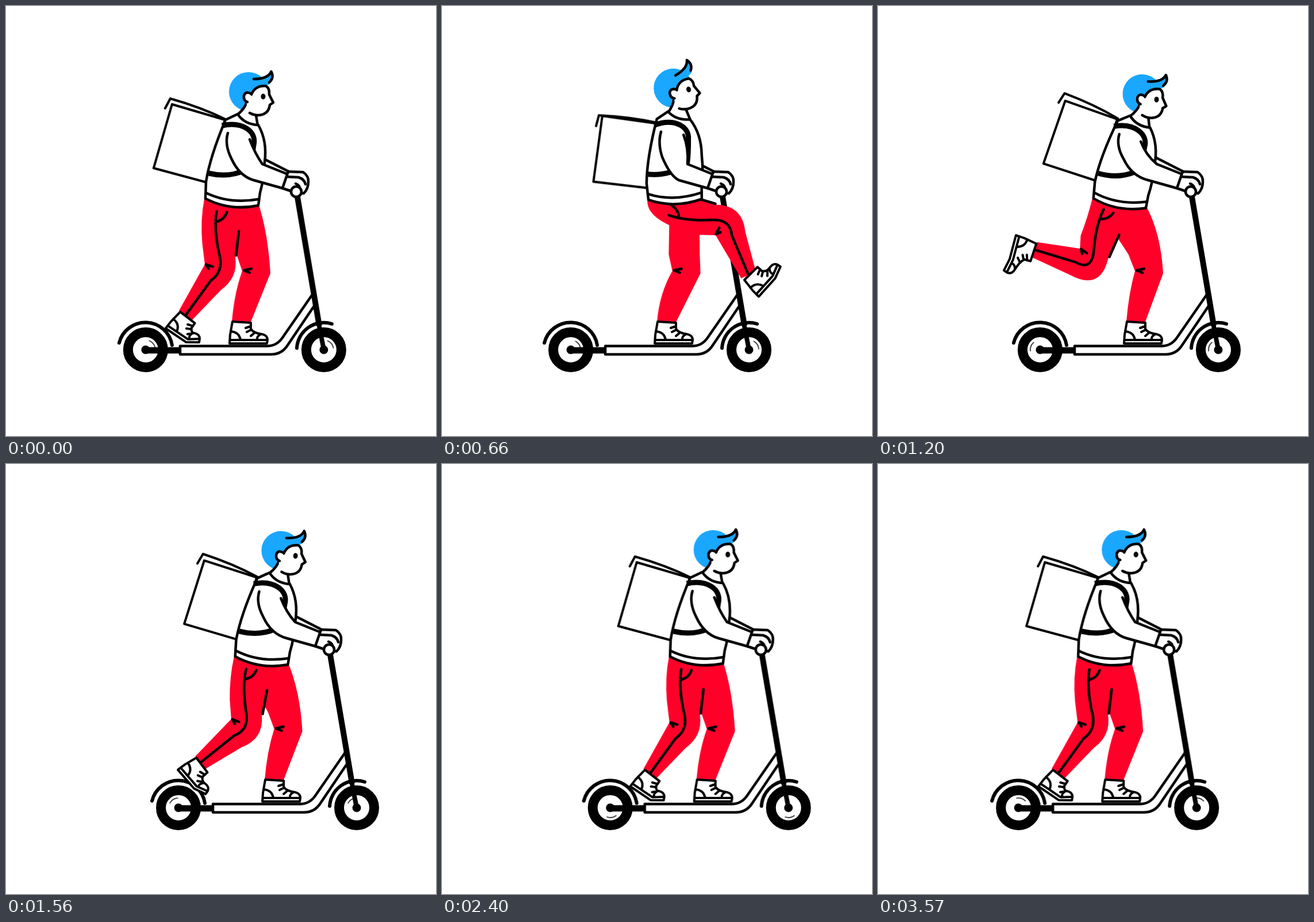
An HTML page for the animation above (3.6 s loop, 748x748 px).

```html
<!DOCTYPE html>
<html lang="en">
<head>
<meta charset="utf-8">
<title>Scooter courier</title>
<style>
  html, body { margin: 0; width: 100%; height: 100%; overflow: hidden; background: #fff; }
  svg { display: block; width: 100vw; height: 100vh; }
  .line { fill: none; stroke: #000; stroke-width: 4.5; stroke-linecap: round; stroke-linejoin: round; }
  .paper { fill: #fff; }
  .red { fill: #ff0029; }
  .blue { fill: #1aa7ff; }
  .thin { stroke-width: 4; }
  .strap { stroke-width: 9; stroke-linecap: butt; }
  .glint { stroke-width: 1.5; animation: spin 3600ms linear infinite; }
  @keyframes spin { from { transform: rotate(-40deg); } to { transform: rotate(3920deg); } }
</style>
</head>
<body>
<svg viewBox="0 0 748 748">
  <defs>
    <g id="wheel">
      <circle r="30.5" fill="#fff" stroke="#000" stroke-width="17"/>
      <circle r="7.5"/>
    </g>
  </defs>
  <g id="all">
    <g id="scooter">
      <use href="#wheel" x="244" y="598"/>
      <use href="#wheel" x="554" y="598"/>
      <g transform="translate(244 598)"><path class="line glint" d="M15 -8A17 17 0 0 1 15 8"/></g>
      <g transform="translate(554 598)"><path class="line glint" d="M15 -8A17 17 0 0 1 15 8"/></g>
      <path class="line" style="stroke-width:6" d="M198 586A47 47 0 0 1 290 590"/>
      <path class="line" style="stroke-width:6" d="M507 595A47 47 0 0 1 568 553"/>
      <path class="line" style="stroke-width:11;stroke-linecap:butt" d="M244 599H304"/>
      <path class="line paper" d="M304 591.500H455Q472 591.500 482 577L536 499L541 516L491 590Q481 606 462 606H304Z"/>
      <path class="line" style="stroke-width:10;stroke-linecap:butt" d="M507 326L546 556"/>
      <path class="line" style="stroke-width:8" d="M545 552L554 598"/>
    </g>
    <path class="line paper" d="M446 264L493 288L490 294L446 276"/>
    <path id="farLeg" class="red"/>
    <path id="farMark" class="line"/>
    <path id="farShoe" class="line paper thin"/>
    <path id="farLace" class="line thin"/>
    <path id="leg" class="red"/>
    <path id="seams" class="line"/>
    <path id="shoe" class="line paper thin"/>
    <path id="lace" class="line thin"/>
    <g id="torso">
      <g id="box">
        <path class="line paper thin" d="M290 172L382 199L351 308L258 283Z"/>
        <path id="lid" class="line thin" d="M278 179L287 162Q340 177 383 198"/>
      </g>
      <g id="head">
        <circle class="blue" cx="423" cy="149" r="34"/>
        <g id="tuft">
          <path class="blue" d="M425 125Q457 126 463 114Q468 126 458 137L430 145Z"/>
          <path class="line" d="M432 127Q457 127 462.500 114Q468 125 459 133"/>
        </g>
        <path class="paper" d="M419 160L415 178L398 200L420 215L442 212L436 186Z"/>
        <path class="line" d="M420 166Q418 177 403 190M436 190L439 208"/>
        <path class="paper" d="M428 153Q434 138 453 139Q460 143 459 154L466 168L460 172Q458 189 440 190Q430 190 420 182V158Z"/>
        <path class="line" d="M428 154Q434 138 453 139Q460 143 459 154L466 168L460 172Q458 189 440 190Q432 190 425 186"/>
        <path class="line paper" d="M428 153Q418 147 415 156Q414 165 421 167"/>
        <ellipse cx="448.500" cy="157.500" rx="4" ry="5"/>
      </g>
      <path class="line paper" d="M383 198L404 188Q416 206 440 207Q456 235 451 272Q450 300 443 325L440 347Q390 357 348 335L349 306Q356 262 383 198Z"/>
      <path class="line" d="M349 325Q390 345 441 336"/>
      <path class="line strap" d="M377 208C412 200 438 218 432 242Q429 264 424 282M354 291Q388 299 416 286"/>
    </g>
    <path id="armFill" class="paper"/>
    <path id="arm" class="line"/>
    <path class="line paper" d="M492 288L518 289Q528 296 527 306Q527 318 519 326L500 323L482 317Z"/>
    <path class="line" d="M490 297L510 298Q520 301 522 310M505 309Q513 312 512 319"/>
    <circle class="line paper" cx="506" cy="323" r="9"/>
  </g>
</svg>
<script>
const LOOP = 3600, RAD = Math.PI / 180;
const $ = id => document.getElementById(id);

// Kicking leg: angles of thigh and shin from straight down, of the foot, and of the bent toe
const rest = { thigh: -4, shin: -36, foot: 34, bend: 34 };
const poses = [
  { at: 0, ...rest },
  { at: 460, thigh: 80, shin: 54, foot: -50, bend: 15 },
  { at: 660, thigh: 76, shin: 23, foot: -48, bend: 18 },
  { at: 930, thigh: 6, shin: -14, foot: 35, bend: 5 },
  { at: 1190, thigh: -21, shin: -107, foot: 105, bend: -12 },
  { at: 1720, ...rest },
  { at: LOOP, ...rest }
];

// Monotone cubic through one joint of the poses
function joint(name, t) {
  const secant = i => poses[i + 1] && poses[i]
    ? (poses[i + 1][name] - poses[i][name]) / (poses[i + 1].at - poses[i].at) : 0;
  const slope = i => {
    const a = secant(i - 1), b = secant(i);
    return a * b <= 0 ? 0 : 2 * a * b / (a + b);
  };
  const i = poses.findIndex(p => p.at > t) - 1;
  const h = poses[i + 1].at - poses[i].at, u = (t - poses[i].at) / h, v = 1 - u;
  return v * v * (1 + 2 * u) * poses[i][name] + u * u * (3 - 2 * u) * poses[i + 1][name]
    + h * u * v * (v * slope(i) - u * slope(i + 1));
}

// Cosine ease from 0 to 1 between two times, skewed by a power
const ease = (t, from, to, power = 1) => {
  const u = Math.min(1, Math.max(0, (t - from) / (to - from)));
  return (1 - Math.cos(Math.PI * u ** power)) / 2;
};

// The push drives the scooter forward, then it drifts back into the next loop
function ride(t) {
  const u = t < 690 ? t + LOOP : t;
  return -20 + 76 * (ease(u, 690, 1500, 0.85) - ease(u, 1500, 690 + LOOP, 1.42));
}

// Upright for the kick, leaning forward for the push
const swayAt = t => 1.05 * ease(t, 0, 560) - 1.4 * ease(t, 560, 1200) + 0.35 * ease(t, 1200, 1900);
const dipAt = t => 12 * Math.exp(-(((t - 930) / 140) ** 2));

// A frame at (ox, oy) turned by deg: maps local x, y to stage coordinates
const frame = (ox, oy, deg) => {
  const c = Math.cos(deg * RAD), s = Math.sin(deg * RAD);
  return (x, y) => [ox + x * c - y * s, oy + x * s + y * c];
};

// Joins command letters and points into path data
const path = parts => parts.map(p => typeof p === 'string' ? p : p.map(v => v.toFixed(2)).join(' ')).join(' ');
const set = (id, ...parts) => $(id).setAttribute('d', path(parts));
const place = (id, transform) => $(id).setAttribute('transform', transform);

function drawShoe(id, laceId, f, bend) {
  const ball = frame(22, 36, -bend);
  const toe = (x, y) => f(...ball(x - 22, y - 36));
  set(id, 'M', f(-16, -1), 'L', f(16, 1), 'L', f(16, 12), 'Q', f(21, 19), toe(36, 21),
    'Q', toe(45, 23), toe(45, 31), 'L', toe(44, 37), 'L', f(22, 37), 'L', f(-21, 37), 'L', f(-20, 22), 'Z');
  set(laceId, 'M', f(-20, 31), 'L', f(22, 31), 'L', toe(44, 31),
    'M', f(-19, 16), 'Q', f(-5, 17), f(-2, 30), 'M', toe(33, 21), 'Q', toe(26, 25), toe(27, 30),
    'M', f(16, 7), 'L', f(7, 10), 'M', f(17, 13), 'L', f(9, 17), 'M', f(23, 18), 'L', f(16, 24));
}

function drawFarLeg(hipX, hipY, body) {
  const kx = 0.25 * hipX + 0.4 * hipY;
  set('farLeg', 'M', body(365, 340), 'L', body(440, 343), 'Q', [457 + kx, 395], [461 + kx, 465],
    'L', [426, 552], 'L', [394, 550], 'Q', [398, 500], [412 + kx, 461],
    'L', [402 + 0.4 * hipX, 432], 'L', body(378, 380), 'Z');
  set('farMark', 'M', [428 + kx, 457], 'L', [415 + kx, 460], 'L', [425 + kx, 464]);
}

function drawLeg(hipX, hipY, body, t) {
  const thigh = joint('thigh', t), shin = joint('shin', t);
  const th = frame(378 + hipX, 350 + hipY, -thigh);
  const knee = th(0, 110), sh = frame(...knee, -shin);
  const mid = frame(...knee, -(thigh + shin) / 2);
  const fold = Math.abs(thigh - shin);
  const cap = 30 + 0.22 * fold, back = 110 - 0.27 * fold;
  set('leg', 'M', body(346, 336), 'Q', body(339, 372), th(-31, 65), 'L', th(-24, back), 'L', sh(-14, 97),
    'L', sh(14, 97), 'L', sh(24, 25), 'Q', mid(cap, 0), th(28, 85), 'L', th(31, 42), 'L', body(438, 344), 'Z');
  set('seams', 'M', th(-10, 8), 'Q', th(-13, 40), th(1, 86), 'Q', mid(9, 0), sh(0, 22), 'L', sh(0, 96),
    'M', th(8, 8), 'Q', th(4, 22), th(-9, 26), 'M', th(31, 40), 'L', th(29, 82),
    'M', th(-10, back + 3), 'L', th(-22, back), 'L', th(-17, back + 7));
  const foot = frame(...sh(0, 97), joint('foot', t));
  drawShoe('shoe', 'lace', (x, y) => foot(x + 5, y + 1), joint('bend', t));
}

// The shoulder follows the body, the elbow half of it, the hand stays on the bar
function drawArm(body) {
  const top = body(387, 221), front = body(425, 232), moved = body(393, 265);
  const half = [(moved[0] + 393) / 2, (moved[1] + 265) / 2];
  const outline = ['M', top, 'Q', [top[0] - 6, top[1] + 20], half, 'Q', [half[0] + 14, 296], [432, 303],
    'L', [482, 317], 'L', [492, 293], 'L', [447, 275], 'Q', [front[0] + 9, front[1] + 24], front];
  set('armFill', ...outline, 'Z');
  set('arm', ...outline);
}

function draw(t) {
  const sway = swayAt(t), up = Math.max(0, sway);
  const hipX = 32 * sway, hipY = 2 * sway + dipAt(t), lean = -8.7 * sway;
  const turned = frame(348 + hipX, 334 + hipY, lean);
  const body = (x, y) => turned(x - 348, y - 334);
  place('all', `translate(${ride(t)} 0)`);
  place('torso', `translate(${hipX} ${hipY}) rotate(${lean} 348 334)`);
  place('box', `translate(0 ${8 * sway - 1})`);
  place('lid', `rotate(${-5 * sway} 383 199)`);
  place('head', `rotate(${-5 * up} 420 195)`);
  place('tuft', `rotate(${-18 * up} 437 128)`);
  drawFarLeg(hipX, hipY, body);
  drawLeg(hipX, hipY, body, t);
  drawArm(body);
}

drawShoe('farShoe', 'farLace', frame(411, 550, 0), 0);
const start = performance.now();
function tick() {
  draw((performance.now() - start) % LOOP);
  requestAnimationFrame(tick);
}
tick();
</script>
</body>
</html>
```
